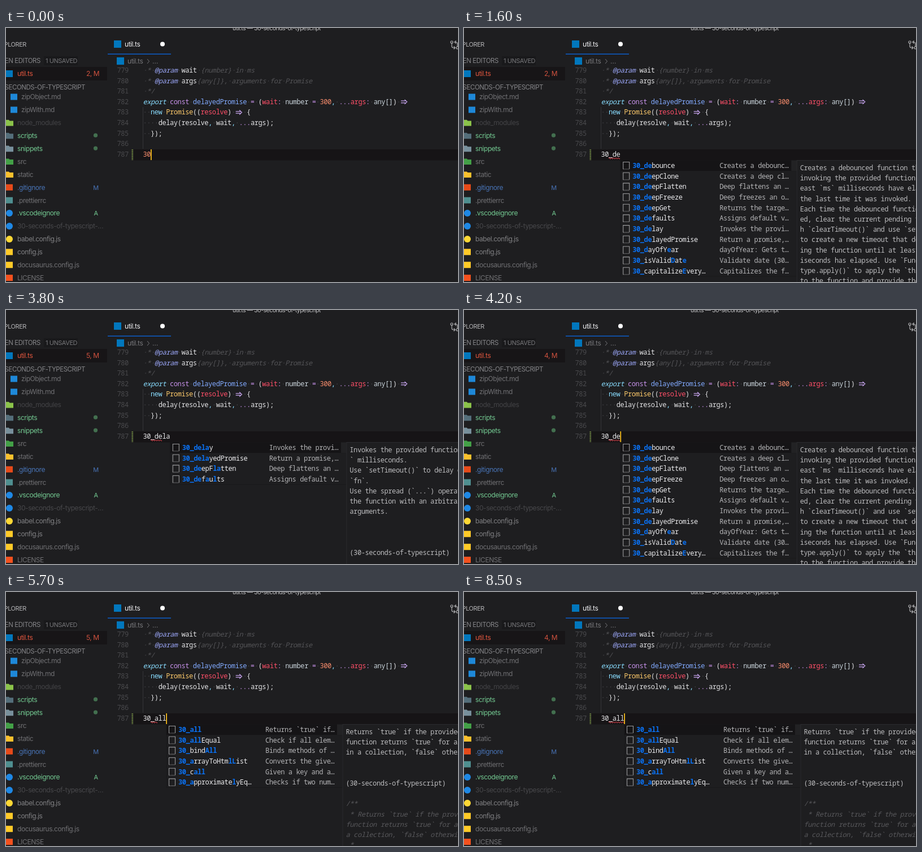
An HTML page for the animation above (8.6 s loop, 800x450 px).

```html
<!DOCTYPE html>
<html lang="en">
<head>
<meta charset="utf-8">
<title>Snippet completion</title>
<style>
html, body { margin: 0; height: 100%; overflow: hidden; background: #1e1e20; }
svg { display: block; width: 100vw; height: 100vh; }
text { white-space: pre; }
.ui { font: 12px Inter, sans-serif; letter-spacing: -.45px; }
.code { font: 500 12px "Noto Sans Mono", monospace; letter-spacing: -.4px; }
.i { font-style: italic; }
</style>
</head>
<body>
<svg viewBox="0 0 800 450"><g id="back"></g><g id="live"></g></svg>
<script>
const LOOP = 8600, X0 = 242.4, CW = 6.8, ROW = 18.68;
const BLUE = '#0a72f5', ORANGE = '#f78c6c', RED = '#d0523f', GREEN = '#73c991', DIM = '#4a4a4d';

const rect = (x, y, w, h, fill, more = '') =>
  `<rect x="${x}" y="${y}" width="${w}" height="${h}" fill="${fill}" ${more}/>`;
const circle = (x, y, r, fill) => `<circle cx="${x}" cy="${y}" r="${r}" fill="${fill}"/>`;
const line = (d, stroke, w = 1, more = '') =>
  `<path d="${d}" fill="none" stroke="${stroke}" stroke-width="${w}" ${more}/>`;
const ui = (x, y, s, fill, more = '') => `<text class="ui" x="${x}" y="${y + 4.3}" fill="${fill}" ${more}>${s}</text>`;
const code = (x, y, s, fill = '#d6d6d8', cls = '') =>
  `<text class="code ${cls}" x="${x}" y="${y + 4}" fill="${fill}">${s}</text>`;
const span = (s, fill) => `<tspan fill="${fill}">${s}</tspan>`;
const lineY = n => 75 + (n - 779) * 18.62;

// ---- editor text: tokens are "key:text", upper case keys are italic
const INK = { g: '#545457', p: '#9aa5f5', w: '#e4e4e6', c: '#89ddff', k: '#c792ea', f: '#82aaff',
  r: '#ff4f68', t: '#c9d3da', o: ORANGE, y: '#ffcb6b' };
const SOURCE = [
  ['G: * ', 'P:@param', 'g: ', 'w:wait', 'G: {number} in ms'],
  ['G: * ', 'P:@param', 'g: ', 'w:args', 'G:{any[]}, arguments for Promise'],
  ['G: */'],
  ['C:export', 'k: const ', 'f:delayedPromise', 'k: = ', 'w:(', 'r:wait', 'k:: ', 't:number', 'k: = ', 'o:300',
    'c:, ', 'k:...', 'r:args', 'k:: ', 't:any[]', 'w:) '],
  ['c:  new ', 'y:Promise', 'w:((', 'r:resolve', 'w:) ', 'w:\u00a0\u00a0 {'],
  ['f:    ', 'w:delay(resolve', 'c:, ', 'w:wait', 'c:, ', 'k:...', 'w:args);'],
  ['w:  });'], [], []
];
const token = s => {
  const key = s[0].toLowerCase(), text = s.slice(2).replace(/ /g, span('·', '#444448'));
  return `<tspan fill="${INK[key]}" ${key !== s[0] ? 'class="i"' : ''}>${text}</tspan>`;
};
const arrow = (col, y) => {
  const x = X0 + col * CW;
  return line(`M${x + 1} ${y - 1.7}h9M${x + 1} ${y + 1.7}h9M${x + 7.5} ${y - 4}l4.3 4l-4.3 4`, '#c9a6f0', 1.2);
};

// ---- explorer rows: icon, colour, name, text colour, status
const FILES = [
  ['square', '#1e88d8', 'zipObject.md', '#707073'],
  ['square', '#1e88d8', 'zipWith.md', '#707073'],
  ['folder', '#8bc34a', 'node_modules', '#434346'],
  ['folder', '#546e7a', 'scripts', GREEN, '•'],
  ['folder', '#78909c', 'snippets', GREEN, '•'],
  ['folder', '#43a047', 'src', '#707073'],
  ['folder', '#fbc02d', 'static', '#707073'],
  ['square', '#e64a19', '.gitignore', '#4873b5', 'M'],
  ['square', '#4f8f90', '.prettierrc', '#707073'],
  ['circle', '#1e88e5', '.vscodeignore', GREEN, 'A'],
  ['circle', '#1e88e5', '30-seconds-of-typescript-…', '#48484b'],
  ['circle', '#fdd835', 'babel.config.js', '#808083'],
  ['square', '#ffca28', 'config.js', '#808083'],
  ['square', '#ffca28', 'docusaurus.config.js', '#707073'],
  ['square', '#f4511e', 'LICENSE', '#707073']
];
const icons = {
  square: (x, y, c) => rect(x, y - 5.5, 12, 11, c),
  circle: (x, y, c) => circle(x + 6, y, 6, c),
  folder: (x, y, c) => `<path d="M${x} ${y - 5}h5l1.5 1.6h6.5v9h-13z" fill="${c}"/>`
};

function background() {
  let s = rect(0, 0, 800, 450, '#1e1e20');
  s += ui(401, -.8, 'util.ts — 30-seconds-of-typescript', '#c4c4c6', 'style="font-size:10.5px;letter-spacing:-.5px"');
  s += ui(36, 29, 'EXPLORER', '#b4b4b6', 'text-anchor="end" style="font-size:11px"');
  s += ui(61, 58, 'OPEN EDITORS', '#858588', 'text-anchor="end" style="font-size:11.5px"');
  s += rect(67, 50, 60, 16, '#19191b') + ui(70, 58, '1 UNSAVED', '#77777a', 'style="font-size:11px"');
  s += rect(0, 69, 179, 24, '#171517') + rect(0, 75, 12, 12, '#0277bd') + ui(20, 81, 'util.ts', '#e2573f');
  s += ui(140, 104.5, '30-SECONDS-OF-TYPESCRIPT', '#858588', 'text-anchor="end" style="font-size:11.5px"');
  FILES.forEach(([icon, color, name, ink, status], i) => {
    const y = 122 + i * 22.9, nested = i < 2;
    s += icons[icon](nested ? 8 : 0, y, color) + ui(nested ? 27 : 20, y, name, ink);
    if (status === '•') s += circle(158.5, y - .5, 3.6, '#43704f');
    else if (status) s += ui(159, y, status, ink, 'text-anchor="middle" style="font-size:11px"');
  });

  s += rect(191, 22, 13, 13, '#0277bd') + ui(210, 29, 'util.ts', '#f0f0f2') + circle(277, 28.5, 4, '#fff');
  s += rect(180, 45.5, 112, 1.4, '#0b62d6');
  s += rect(196, 52, 13, 13, '#0277bd') + ui(215, 59, 'util.ts', '#77777a') + ui(259, 59, '…', '#77777a');
  s += line('M250 55l3.5 4l-3.5 4', '#77777a');
  s += line('M789 27v5q0 3 3 3h3m-2.500 -2.500l2.500 2.500l-2.500 2.500M799 33v-5q0-3-3-3h-2m2.500-2.500l-2.500 2.500l2.500 2.500',
    '#b0b0b2', 1.2);
  s += line('M787 25a2 2 0 1 0 4 0a2 2 0 1 0-4 0M797 35a2 2 0 1 0 4 0a2 2 0 1 0-4 0', '#b0b0b2', 1.2);

  s += rect(226, 215, 574, 19.5, '#161416');
  s += line('M242.500 140V214', '#363639');
  SOURCE.forEach((tokens, i) => {
    const y = lineY(779 + i);
    s += code(196.5, y, 779 + i, DIM) + code(X0, y, tokens.map(token).join(''));
  });
  s += arrow(67, lineY(782)) + arrow(24, lineY(783));
  s += rect(222.5, 215, 2.5, 19, '#34402a') + line('M223.700 215V234', '#6b7a3c', 2.5, 'stroke-dasharray="1.5 1.5"');
  return s;
}

// ---- completion lists: "label|description"; [..] marks matched letters
const LISTS = {
  any: {
    scroll: true,
    items: ['30_accumulate|Returns an array …', '30_all|Returns `true` if…', '30_allEqual|Check if all elem…',
      '30_and|Returns `true` if…', '30_any|Returns `true` if…', '30_aperture|Returns an array …',
      '30_approximatelyEq…|Checks if two num…', '30_arrayToCSV|Converts a 2D arr…',
      '30_arrayToHtmlList|Converts the give…', '30_atob|Creates a functio…', '30_attempt|Attempts to invok…',
      '30_attempt2|Attempts to invok…'],
    docs: ['Returns an array of partial sums.', 'Use `Array.prototype.reduce()`, `Array.pr',
      'ototype.slice(-1)` and the unary `+` oper', 'ator to add each value to the unary array',
      'containing the previous sum.', '', '(30-seconds-of-typescript)', '', '/**',
      ' * Returns an array of partial sums.', ' * Use `Array.prototype.reduce()`, ', '`Array.prototype.slice(-1)` and the']
  },
  de: {
    items: ['30_debounce|Creates a debounc…', '30_deepClone|Creates a deep cl…', '30_deepFlatten|Deep flattens an …',
      '30_deepFreeze|Deep freezes an o…', '30_deepGet|Returns the targe…', '30_defaults|Assigns default v…',
      '30_delay|Invokes the provi…', '30_delayedPromise|Return a promise,…', '[30_d]ayOfY[e]ar|dayOfYear: Gets t…',
      '[30_]isValid[D]at[e]|Validate date (30…', '[30_]capitalize[E]very…|Capitalizes the f…'],
    docs: ['Creates a debounced function that delays', 'invoking the provided function until at l',
      'east `ms` milliseconds have elapsed since', 'the last time it was invoked.',
      'Each time the debounced function is invok', 'ed, clear the current pending timeout wit',
      'h `clearTimeout()` and use `setTimeout()`', 'to create a new timeout that delays invok',
      'ing the function until at least `ms` mill', 'iseconds has elapsed. Use `Function.proto',
      'type.apply()` to apply the `this` context', 'to the function and provide the necessary']
  },
  dela: {
    items: ['30_delay|Invokes the provi…', '30_delayedPromise|Return a promise,…',
      '[30_de]epF[la]tten|Deep flattens an …', '[30_de]f[a]u[l]ts|Assigns default v…'],
    docs: ['Invokes the provided function after `wait', '` milliseconds.', 'Use `setTimeout()` to delay execution of',
      '`fn`.', 'Use the spread (`...`) operator to supply', 'the function with an arbitrary number of',
      'arguments.', '', '', '', '(30-seconds-of-typescript)']
  },
  all: {
    items: ['30_all|Returns `true` if…', '30_allEqual|Check if all elem…', '[30_]bind[All]|Binds methods of …',
      '[30_a]rrayToHtm[lL]ist|Converts the give…', '[30_]c[all]|Given a key and a…',
      '[30_a]pproximate[l]yEq…|Checks if two num…'],
    docs: ['Returns `true` if the provided predicate', 'function returns `true` for all elements',
      'in a collection, `false` otherwise.', '', '', '(30-seconds-of-typescript)', '', '/**',
      ' * Returns `true` if the provided predicate', 'function returns `true` for all elements in',
      'a collection, `false` otherwise.', ' *']
  }
};

function popup(query, { items, docs, scroll }) {
  const x = X0 + query.length * CW + .8, top = 234.5, h = items.length * ROW;
  let s = rect(x, top, 312, h, '#1e1e20', 'stroke="#19191b"') + rect(x, top, 312, ROW, '#151416');
  s += rect(x + 302, top, 10, scroll ? 50 : ROW, scroll ? '#343437' : '#222224');
  items.forEach((item, i) => {
    const y = 244 + i * ROW, [name, info] = item.split('|');
    const label = name.startsWith(query) ? `[${query}]` + name.slice(query.length) : name;
    s += line(`M${x + 4.500} ${y + 6}v-12.500h11v12.500`, '#9a9a9c', 1.1);
    s += line(`M${x + 4.500} ${y + 6}h11`, '#9a9a9c', 1.1, 'stroke-dasharray="1.5 1.2"');
    s += code(x + 21, y, label.replace(/\[(.*?)\]/g, (_, m) =>
      `<tspan fill="${BLUE}" font-weight="700" style="font-weight:700">${m}</tspan>`), '#ececee');
    s += code(x + 175, y, info, '#b4b4b6');
  });
  s += rect(x + 312, top, 800, 230, '#1e1e20', 'stroke="#2b2b2e"');
  const comment = docs.indexOf('/**');
  docs.forEach((text, i) => {
    const quiet = comment >= 0 && i >= comment;
    s += code(x + 317.5, 248 + i * 18.2, text, quiet ? '#58585b' : '#bcbcbe', quiet ? 'i' : '');
  });
  return s;
}

// ---- timeline: [start, value]
const TYPED = [[-300, '30'], [800, '30_', 'any'], [1000, '30_d', 'de'], [1100, '30_de', 'de'], [2800, '30_del', 'dela'],
  [3000, '30_dela', 'dela'], [4000, '30_del', 'dela'], [4100, '30_de', 'de'], [4600, '30_d', 'de'],
  [4700, '30_', 'any'], [5300, '30_a', 'any'], [5400, '30_al', 'all'], [5500, '30_all', 'all']];
const PROBLEMS = [[0, 2], [1900, 5], [4000, 4], [5200, 5], [6000, 4]];
const ERRORS = [[0, 0], [1100, 3], [4700, 0], [5500, 2], [6000, 4]];
const at = (steps, t) => steps.filter(step => step[0] <= t).pop();

function squiggle(cols) {
  let d = `M${X0 + 2 * CW} 231`;
  for (let i = 0; i < cols * CW / 4 - .5; i++) d += 'q1-2.400 2 0t2 0';
  return line(d, '#e0404a');
}

function scene(t) {
  const [since, query, list] = at(TYPED, t), y = lineY(787);
  let s = ui(142, 81, at(PROBLEMS, t)[1] + ', M', RED);
  s += code(X0, y, query, query.length < 4 ? ORANGE : '#e8e8ea');
  const cols = at(ERRORS, t)[1];
  if (cols) s += squiggle(cols);
  if (list) s += popup(query, LISTS[list]);
  if (Math.floor((t - since) / 500) % 2 === 0) s += rect(X0 + query.length * CW, 215, 1.7, 19, '#ffc21a');
  return s;
}

const live = document.getElementById('live');
document.getElementById('back').innerHTML = background();
let shown = '';
function frame() {
  const next = scene(performance.now() % LOOP);
  if (next !== shown) live.innerHTML = shown = next;
  requestAnimationFrame(frame);
}
frame();
</script>
</body>
</html>
```
